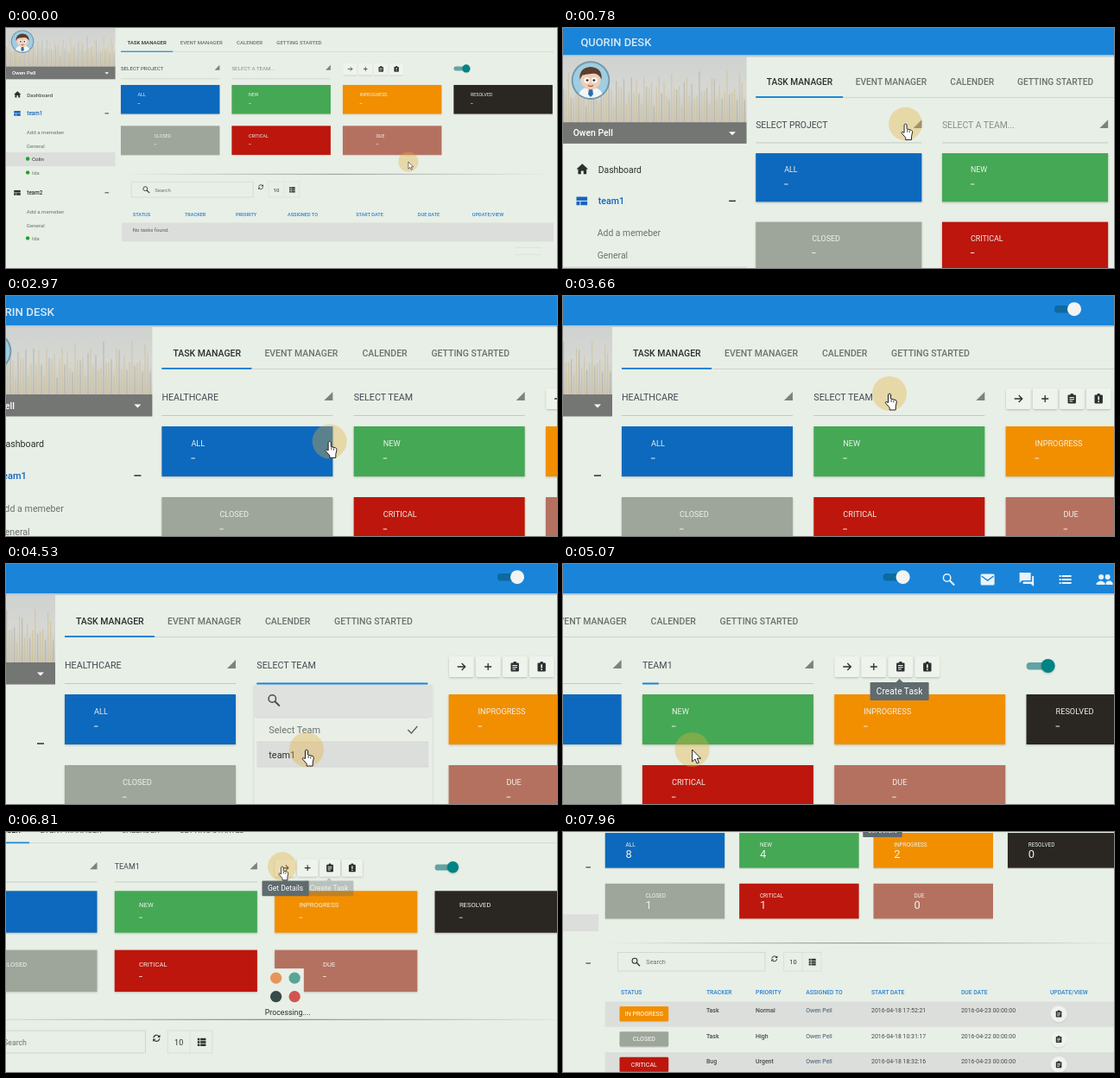
These frames come from a looping animation (638x278 px, 7.99 s). An HTML page:

```html
<!DOCTYPE html>
<html lang="en">
<head>
<meta charset="utf-8">
<title>Task manager walkthrough</title>
<style>
  html, body { margin: 0; width: 100%; height: 100%; overflow: hidden; background: #e8efe6; }
  svg { display: block; width: 638px; height: 278px; font-family: Roboto, "Liberation Sans", sans-serif; }
</style>
</head>
<body>
<svg id="stage" viewBox="0 0 638 278" xmlns="http://www.w3.org/2000/svg"></svg>
<script>
const LOOP = 7990;
const BG = '#e8efe6', BLUE = '#1a84d8', INK = '#2b302e', GREY = '#6c726e';
const USER = 'Owen Pell', BRAND = 'QUORIN DESK';
const PITCH = 222.3, COL = 230;

// Moments at which the interface reacts, in ms
const PROJECT_OPEN = 1440, PROJECT_PICK = 2280, TEAM_READY = 2800;
const TEAM_OPEN = 3750, TEAM_PICK = 4800, HOVER = 6500, LOADING = 6720, LOADED = 7230, SPINNER_END = 7290;

// ---- markup helpers -------------------------------------------------------
const text = (x, y, s, size = 10.7, fill = INK, extra = '') =>
  `<text x="${x}" y="${y + size * 0.355}" font-size="${size}" fill="${fill}" ${extra}>${s}</text>`;
const rect = (x, y, w, h, fill, extra = '') =>
  `<rect x="${x}" y="${y}" width="${w}" height="${h}" fill="${fill}" ${extra}/>`;
const circle = (x, y, r, fill, extra = '') =>
  `<circle cx="${x}" cy="${y}" r="${r}" fill="${fill}" ${extra}/>`;
const path = (d, fill, extra = '') => `<path d="${d}" fill="${fill}" ${extra}/>`;
const line = (d, stroke, width = 1.5) =>
  `<path d="${d}" fill="none" stroke="${stroke}" stroke-width="${width}"/>`;
const at = (x, y, body) => `<g transform="translate(${x} ${y})">${body}</g>`;
const group = (id, body) => `<g id="${id}">${body}</g>`;
const MEDIUM = 'font-weight="500"', MIDDLE = 'text-anchor="middle"', SHADOW = 'filter="url(#shadow)"';

// ---- icons, centred on the origin ----------------------------------------
const icons = {
  search: c => `<circle cx="-2" cy="-2" r="4.2" fill="none" stroke="${c}" stroke-width="1.5"/>` + line('M1 1L6.5 6.5', c, 1.9),
  mail: c => rect(-8, -6.5, 16, 13, c, 'rx="1.5"') + line('M-7 -4L0 1L7 -4', BLUE, 1.5),
  chat: c => path('M-8 -8H5V1H-5L-8 4Z', c) + path('M6.5 -4H8.5V8L5 5H-4V2.5H6.5Z', c),
  list: c => [-4, 0, 4].map(y => rect(-7, y - 1, 2, 2, c) + rect(-4, y - 1, 11, 2, c)).join(''),
  rows: c => [-4, 0, 4].map(y => rect(-5.5, y - 1.5, 3, 3, c) + rect(-1.5, y - 1.5, 7.5, 3, c)).join(''),
  people: c => circle(-3.5, -3, 3, c) + circle(4, -3, 3, c) + path('M-9 6V4Q-4 -1 1 4V6ZM2 6V3Q7 -1 10 4V6Z', c),
  home: c => path('M-7 0L0 -6.5L7 0H5V6H1.5V2H-1.5V6H-5V0Z', c),
  team: c => rect(-6.5, -5, 13, 4.5, c) + rect(-6.5, 0.5, 4, 4.5, c) + rect(-1.5, 0.5, 8, 4.5, c),
  arrow: c => line('M-4.5 0H4M0.5 -4L4.5 0L0.5 4', c, 1.3),
  plus: c => line('M-4 0H4M0 -4V4', c, 1.3),
  task: c => rect(-4.7, -4.5, 9.4, 10, c, 'rx="1"') + rect(-1.7, -6, 3.4, 2.5, c, 'rx="1"') +
    line('M-2.8 -1.5H2.8M-2.8 .7H2.8M-2.8 2.9H1', '#fff', 1),
  alert: c => rect(-4.7, -4.5, 9.4, 10, c, 'rx="1"') + rect(-1.7, -6, 3.4, 2.5, c, 'rx="1"') +
    line('M0 -2.8V1.4M0 2.5V4', '#fff', 1.5),
  refresh: c => line('M-4.2 -.5A4.3 4.3 0 0 1 3.5 -2.6M4.2 .5A4.3 4.3 0 0 1 -3.5 2.6', c, 1.4) +
    path('M5 -5V-1H1ZM-5 5V1H-1Z', c)
};
const icon = (name, x, y, color = INK) => at(x, y, icons[name](color));

// ---- page parts -----------------------------------------------------------
function header() {
  const names = ['search', 'mail', 'chat', 'list', 'people'];
  return rect(0, -40, 1110, 74, BLUE) + rect(0, 34, 1110, 2, '#b9c9cf') +
    text(21, 18.5, BRAND, 13.3, '#d9e9f5', MEDIUM) +
    rect(731, 11, 29, 8.5, '#0c6a9f', 'rx="4"') + circle(754, 15.2, 8, '#f1f4f2') +
    names.map((n, i) => icon(n, 807 + 45 * i, 18, '#e9f3fa')).join('');
}

function avatar() {
  return at(33, 64, circle(0, 0, 23, '#7199ad') + circle(0, 0, 21, '#9fcde1') +
    path('M-14 16Q-11 8 0 8Q11 8 14 16Q7 21 0 21Q-7 21 -14 16Z', '#f4f6f5') +
    path('M-2 9H2L3 17L0 20L-3 17Z', '#2a6cae') +
    circle(0, -1, 12, '#f1cdb2') + path('M-13 -1Q-14 -15 0 -16Q14 -15 13 -1Q9 -9 3 -8Q-7 -7 -10 -6Z', '#5c3d2e') +
    circle(-4.5, 0, 3.4, '#fff') + circle(4.5, 0, 3.4, '#fff') +
    circle(-4, 0, 1.5, '#333') + circle(4, 0, 1.5, '#333') + line('M-3 6Q0 8 3 6', '#a44', 1.2));
}

function photo() {
  let planks = '';
  for (let i = 0; i < 73; i++) {
    const top = 74 + 13 * Math.sin(i * 2.3) + 9 * Math.sin(i * 5.1);
    planks += rect(i * 3, top, 1.3, 114 - top, i % 3 ? '#cfc08f' : '#aaaca9', 'opacity=".6"');
  }
  return rect(0, 36, 219, 78, 'url(#photo)') + planks;
}

function sidebar() {
  const item = (y, s) => text(41, y, s, 10.7, GREY);
  const person = (y, s, fill = GREY) => circle(43.5, y - 1, 3.8, '#21a02c') + text(52, y, s, 10.7, fill);
  const team = (y, s, c) => icon('team', 22.5, y, c) + text(42, y, s, 11, c, MEDIUM) + line(`M198 ${y}h8`, INK, 1.5);
  return photo() + rect(0, 114, 219, 25.5, '#747674') + text(12, 127, USER, 10.7, '#fff', MEDIUM) +
    path('M198 125.5h8l-4 4z', '#fff') + avatar() +
    icon('home', 23, 170) + text(42, 171, 'Dashboard', 10.7) +
    team(208, 'team1', '#1565c0') + item(246, 'Add a memeber') + item(273, 'General') +
    rect(0, 286, 219, 28, '#dcdedb') + person(300, 'Colin', INK) + person(327.5, 'Ida') +
    team(367, 'team2', INK) + item(404.5, 'Add a memeber') + item(432, 'General') + person(459, 'Ida');
}

function tabs() {
  const labels = [[243, 'TASK MANAGER'], [349, 'EVENT MANAGER'], [462, 'CALENDER'], [542, 'GETTING STARTED']];
  return labels.map(([x, s], i) => text(x, 66, s, 10.5, i ? GREY : INK, MEDIUM)).join('') +
    rect(COL, 84, 867, 0.8, '#c9cec8') + rect(COL, 83, 104, 2, BLUE);
}

const field = (id, x) => `<text id="${id}" x="${x}" y="120.8" font-size="10.7"/>` +
  line(`M${x} 138.5h198`, '#c3c9c2', 1) + path(`M${x + 198} 111v10h-10z`, '#7d827e', `id="${id}Mark"`) +
  `<rect id="${id}Line" x="${x}" y="137.5" height="2" fill="${BLUE}"/>`;

function toolbar() {
  const names = ['arrow', 'plus', 'task', 'alert'];
  return names.map((n, i) => rect(675 + 31 * i, 107, 28.5, 24, '#eef3ec', 'rx="2" ' + SHADOW) +
    icon(n, 689.2 + 31 * i, 119)).join('') +
    rect(897, 114, 29, 8.5, '#62a3a3', 'rx="4"') + circle(922, 118, 8, '#008384', SHADOW);
}

const card = y => ([label, color, value, dx], i) => {
  const x = COL + PITCH * i;
  return rect(x, y, 198, 58, color, SHADOW) + text(x + dx, y + 19.5, label, 9.2, '#eef2ea') +
    `<g class="before">${rect(x + dx, y + 36.5, 4.5, 1, '#eef2ea')}</g>` +
    `<g class="after">${text(x + dx, y + 35, value, 18.5, '#eef2ea')}</g>`;
};
const cardsTop = [
  ['ALL', '#1069bd', 8, 34], ['NEW', '#45a854', 4, 34], ['INPROGRESS', '#f28f00', 2, 34], ['RESOLVED', '#292820', 0, 34]
].map(card(151)).join('');
const cardsBottom = [
  ['CLOSED', '#9ea69c', 1, 67], ['CRITICAL', '#bd1808', 1, 34], ['DUE', '#b57161', 0, 67]
].map(card(233)).join('');

const tableHead = xs => ['STATUS', 'TRACKER', 'PRIORITY', 'ASSIGNED TO', 'START DATE', 'DUE DATE', 'UPDATE/VIEW']
  .map((s, i) => text(xs[i], 410.6, s, 9.7, '#2a80d2', MEDIUM)).join('');

function table() {
  const xs = [256, 397.7, 479.4, 562.5, 671, 819.6, 967];
  const rows = [
    ['IN PROGRESS', '#f28f00', 'Task', 'Normal', '2016-04-18 17:52:21', '2016-04-23 00:00:00'],
    ['CLOSED', '#9ea69c', 'Task', 'High', '2016-04-18 10:31:17', '2016-04-22 00:00:00'],
    ['CRITICAL', '#bd1808', 'Bug', 'Urgent', '2016-04-18 18:32:16', '2016-04-23 00:00:00']
  ];
  const body = rows.map(([status, color, tracker, priority, start, due], i) => {
    const y = 426.5 + 42 * i;
    const cells = [tracker, priority, USER, start, due].map((s, k) =>
      text(xs[k + 1], y + 15, s, 9.9, k === 2 ? '#3f5870' : '#444a47', k < 2 ? MEDIUM : '')).join('');
    return (i % 2 ? '' : rect(COL, y, 867, 42, '#dcdedb')) +
      rect(254, y + 8, 81, 24.5, color, 'rx="2" ' + SHADOW) +
      text(294.5, y + 20.3, status, 10.2, '#fff', MIDDLE) + cells +
      circle(981.5, y + 20.5, 13.5, '#eff3ed', SHADOW) + icon('task', 981.5, y + 20.5);
  }).join('');
  return `<g class="before">${tableHead([254, 358, 460, 564, 701, 825, 934])}` +
    rect(232, 427, 865, 38, '#dcdedb') + text(254, 441.5, 'No tasks found.', 10.3, '#555b58') +
    line('M1019 477h54M1019 491h54', '#d3dad1', 1) + `</g><g class="after">${tableHead(xs)}${body}</g>`;
}

const filters = () => rect(232, 329, 865, 1.3, 'url(#rule)') +
  rect(251, 345, 244, 31, 'none', 'stroke="#ccd0c5"') + icon('search', 281, 361) + text(298, 361, 'Search', 10.5, GREY) +
  icon('refresh', 510.5, 355.5) + rect(526, 345, 62, 31, 'none', 'stroke="#d5dbd2"') + line('M557 345v31', '#dae0d7', 1) +
  text(541.5, 361, '10', 10.7, INK, MIDDLE) + icon('rows', 573, 361);

const panel = (id, x, first, second) => group(id, at(x, 140,
  rect(-3, 0, 206, 150, '#e9efe7', SHADOW) + rect(-3, 0, 206, 38, '#dee1dd') + rect(0, 66, 199, 29, '#dcdedb') +
  line('M0 38h199M0 66h199M0 95h199', '#cfd3ce', 0.8) + at(20, 18, icons.search('#4a4f4c')) +
  text(14, 52, first, 10.9, GREY) + text(14, 80.8, second, 10.9, INK) + line('M175 52l4 4l7 -8', '#555b58', 1.2)));

const tooltip = (id, x, w, s) => group(id, rect(x, 137, w, 21, '#5f6b6e', 'rx="1"') +
  path(`M${x + w / 2 - 4} 137l4 -4l4 4z`, '#5f6b6e') + text(x + w / 2, 147.3, s, 10.2, '#fff', MIDDLE));

const spinner = () => group('spinner', rect(663, 258.7, 52, 68, BG) +
  group('dots', ['#e8955c', '#56a596', '#374b48', '#d05550'].map((c, i) =>
    circle(i % 2 ? 12.9 : -12.9, i < 2 ? -12.9 : 12.9, 8, c)).join('')) +
  text(661, 319, 'Processing....', 10.5, INK));

const pointer = () => group('cursor', circle(0, 0, 20, '#e2ae3c', 'opacity=".36"') +
  `<g id="arrow">${path('M0 0V14L3.3 11L5.5 16L7.8 15L5.7 10.2H10Z', '#fff', 'stroke="#222"')}</g>` +
  `<g id="hand">${path('M-1.5 1Q0 -1 1.6 1V6L7 7.5Q8.5 8 8.3 10L7.2 15V19H.2V16.5L-5 10.5Q-4.5 8.5 -1.5 10.5Z',
    '#fff', 'stroke="#222" stroke-linejoin="round"')}${line('M2.2 7V10M4.8 8V10.5', '#222', 0.8)}</g>`);

const stage = document.getElementById('stage');
stage.innerHTML = `<defs>
  <filter id="shadow" x="-20%" y="-20%" width="140%" height="150%"><feDropShadow dx="0" dy="1" stdDeviation="1" flood-opacity=".22"/></filter>
  <linearGradient id="photo" x2="0" y2="1"><stop stop-color="#cfd2d0"/><stop offset=".5" stop-color="#d6d7d2"/><stop offset="1" stop-color="#cbc8bc"/></linearGradient>
  <linearGradient id="rule"><stop stop-color="#777" stop-opacity="0"/><stop offset=".5" stop-color="#777c78"/><stop offset="1" stop-color="#777" stop-opacity="0"/></linearGradient>
  </defs>` + rect(0, 0, 638, 278, BG) + group('page',
  sidebar() + header() + tabs() + field('project', COL) + field('team', COL + PITCH) + toolbar() +
  cardsTop + group('rowTwo', cardsBottom) + group('lower', filters() + table()) +
  panel('projectPanel', COL, 'Select Project', 'healthcare') +
  panel('teamPanel', COL + PITCH, 'Select Team', 'team1') + tooltip('createTip', 716, 68, 'Create Task') +
  tooltip('detailTip', 657, 65, 'Get Details') + spinner() + pointer());

// ---- motion ---------------------------------------------------------------
// Zoom in, pan to the team field, pan to the buttons, zoom out to the table: time, zoom, x, y
const camera = [
  [0, 0.578, 0, -21.3], [60, 0.578, 0, -21.3], [920, 1, 0, 0], [2640, 1, 0, 0], [3540, 1, -162, 0],
  [4560, 1, -162, 0], [5310, 1, -423, 0], [6330, 1, -423, 0], [7230, 0.699, -112, -104.5]
];
// time, x, y
const pointerPath = [
  [0, 806, 305], [760, 408.6, 116], [1600, 408.6, 116], [2100, 327, 215], [2500, 327, 215],
  [3500, 540, 113], [3950, 540, 113], [4500, 510, 215], [5670, 510, 215], [6400, 685, 117]
];

const $ = id => document.getElementById(id);
const clamp = v => Math.max(0, Math.min(1, v));
const ramp = (t, start, length) => clamp((t - start) / length);
const ease = u => u * u * (3 - 2 * u);
const pulse = (t, start, end, length) => ease(ramp(t, start, length)) * (1 - ease(ramp(t, end, length)));

function follow(keys, t) {
  const i = keys.findIndex(k => k[0] > t);
  if (i < 0) return keys[keys.length - 1].slice(1);
  const a = keys[i - 1], b = keys[i], u = ease((t - a[0]) / (b[0] - a[0]));
  return a.slice(1).map((v, k) => v + (b[k + 1] - v) * u);
}

const move = (id, x, y, more = '') => $(id).setAttribute('transform', `translate(${x} ${y}) ${more}`);
const show = (el, on) => el.setAttribute('display', on ? 'inline' : 'none');
function label(id, value, fill) {
  $(id).textContent = value;
  $(id).setAttribute('fill', fill);
}
function dropdown(id, t, open, pick) {
  const k = pulse(t, open + 60, pick, 200);
  show($(id + 'Panel'), k > 0.01);
  show($(id + 'Mark'), k < 0.5);
  move(id + 'Panel', 0, 140 * (1 - k), `scale(1 ${k})`);
  $(id + 'Line').setAttribute('width', 198 * pulse(t, open, pick, 335));
}

function render(t) {
  const [zoom, x, y] = follow(camera, t);
  move('page', x, y, `scale(${zoom})`);

  label('project', t >= PROJECT_PICK ? 'HEALTHCARE' : 'SELECT PROJECT', '#414a52');
  if (t >= TEAM_PICK) label('team', 'TEAM1', '#414a52');
  else if (t >= TEAM_READY) label('team', 'SELECT TEAM', '#414a52');
  else label('team', 'SELECT A TEAM...', '#878d89');
  dropdown('project', t, PROJECT_OPEN, PROJECT_PICK);
  dropdown('team', t, TEAM_OPEN, TEAM_PICK);

  // The larger figures push the content below them down
  const loaded = t >= LOADED;
  document.querySelectorAll('.before').forEach(el => show(el, !loaded));
  document.querySelectorAll('.after').forEach(el => show(el, loaded));
  move('rowTwo', 0, loaded ? 2 : 0);
  move('lower', 0, loaded ? 4 : 0);

  $('createTip').setAttribute('opacity', pulse(t, TEAM_PICK + 100, LOADING, 150));
  $('detailTip').setAttribute('opacity', ramp(t, HOVER, 150));

  show($('spinner'), t >= LOADING && t < SPINNER_END);
  const turn = (t - LOADING) / 600;
  const angle = 90 * (Math.floor(turn) + ease(clamp((turn % 1) * 2 - 1)));
  move('dots', 689.3, 284.8, `rotate(${angle})`);

  const [px, py] = follow(pointerPath, t);
  move('cursor', px, py);
  const pointing = (t > 690 && t < TEAM_PICK + 150) || t > 6300;
  show($('hand'), pointing);
  show($('arrow'), !pointing);
}

const begin = performance.now();
function tick() {
  render((performance.now() - begin) % LOOP);
  requestAnimationFrame(tick);
}
render(0);
requestAnimationFrame(tick);
</script>
</body>
</html>
```
